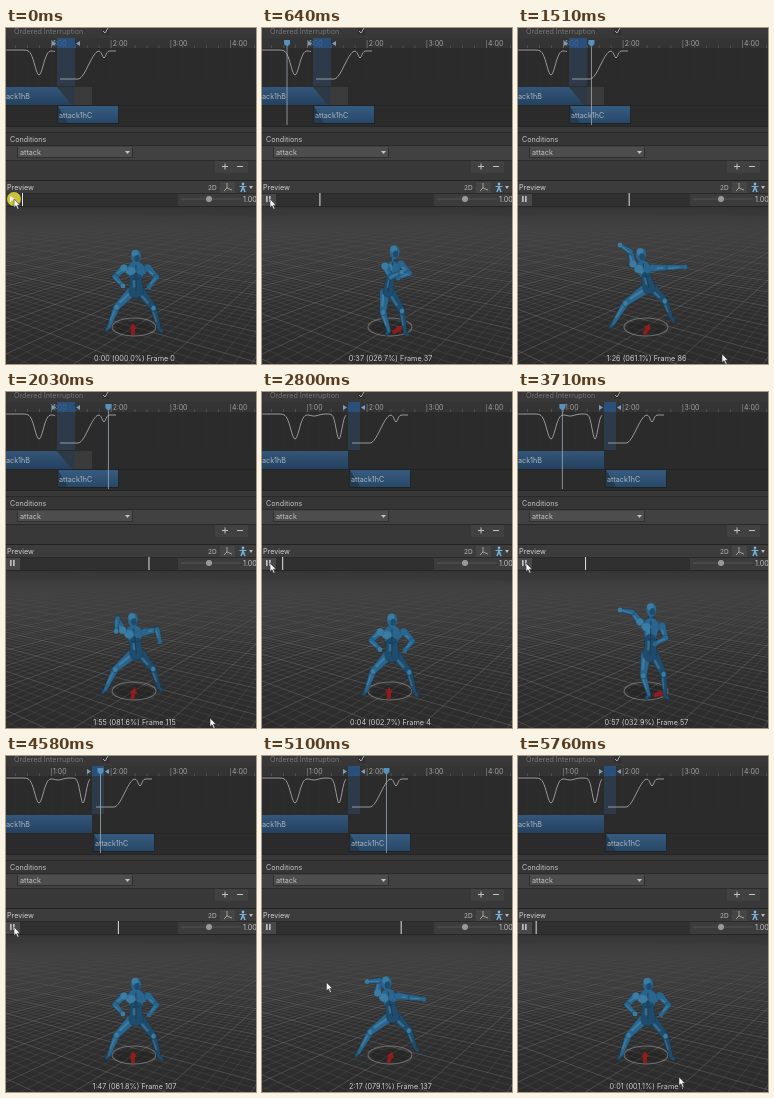
An HTML page with a canvas that plays this animation: 250x336 px, repeating every 5.83 s.

```html
<!DOCTYPE html>
<html lang="en">
<head>
<meta charset="utf-8">
<title>Transition preview</title>
<style>
html, body { margin: 0; width: 100%; height: 100%; overflow: hidden; background: #383838; }
canvas { display: block; width: 250px; height: 336px; }
</style>
</head>
<body>
<canvas id="stage" width="250" height="336"></canvas>
<script>
const c = document.getElementById('stage').getContext('2d');
const LOOP = 5830, CUT = 2620;

// Key poses: body anchors only; elbows, knees and head follow from them.
// hip, neck, [shoulder half width, shoulder tilt], hands, feet, [heading]
const GUARD = [[130, 263], [130, 237], [12, 0], [117, 258], [143, 259], [103, 299], [153, 300], [0]];
const TURN = [[126, 264], [131, 234], [8, -1], [140, 244], [136, 250], [127, 303], [143, 304], [1]];
const REACH = [[132, 263], [133, 229], [11, 2], [102, 218], [137, 252], [131, 303], [147, 303], [1.3]];
const LUNGE = [[131, 260], [125, 235], [10, 2], [102, 217], [167, 239], [95, 296], [153, 289], [.45]];

const clamp = u => Math.min(1, Math.max(0, u));
const smooth = u => u * u * (3 - 2 * u);
const mix = (a, b, u) => a.map((v, k) => v + (b[k] - v) * u);
const bump = (x, mid, width) => Math.exp(-(((x - mid) / width) ** 2));

// The second attack begins at `next`; both takes share the same poses.
function poseAt(frame, next, total) {
  const keys = [[0, GUARD], [38, TURN], [57, REACH], [next, GUARD], [next + 15, LUNGE], [total, GUARD]];
  const n = Math.max(1, keys.findIndex(k => k[0] >= frame));
  const [from, a] = keys[n - 1], [to, b] = keys[n];
  const u = smooth(clamp((frame - from) / (to - from)));
  return a.map((v, k) => mix(v, b[k], u));
}

function rect(x, y, w, h, fill) { c.fillStyle = fill; c.fillRect(x, y, w, h); }
function text(s, x, y, fill = '#c4c4c4', size = 7.2, align = 'left') {
  c.font = size + 'px Inter, sans-serif';
  c.textAlign = align;
  c.fillStyle = fill;
  c.fillText(s, x, y);
}
function trace(p) {
  c.beginPath();
  for (let k = 0; k < p.length; k += 2) c.lineTo(p[k], p[k + 1]);
}
function poly(p, fill) { trace(p); c.closePath(); c.fillStyle = fill; c.fill(); }
function line(p, stroke, width = 1) { trace(p); c.strokeStyle = stroke; c.lineWidth = width; c.stroke(); }
function oval(x, y, rx, ry, fill) {
  c.beginPath(); c.ellipse(x, y, rx, ry, 0, 0, 7); c.fillStyle = fill; c.fill();
}
function vertical(y0, y1, from, to) {
  const g = c.createLinearGradient(0, y0, 0, y1);
  g.addColorStop(0, from);
  g.addColorStop(1, to);
  return g;
}
function plot(from, to, height) {
  const p = [];
  for (let x = from; x <= to; x++) p.push(x, height(x - from));
  line(p, '#b4b4b4', .8);
}

function timeline(isB, frame) {
  const start = isB ? 86 : 51, end = isB ? 98 : 69, clip = isB ? 88 : 52;
  rect(0, 0, 250, 100, '#383838');
  text('Ordered Interruption', 8, 5.5, '#777');
  rect(96, -1, 7, 8, '#303030');
  line([97, 3, 99, 5, 102, 0], '#aaa');
  rect(0, 10, 250, 10, '#343434');
  rect(0, 20, 250, 78, '#2b2b2b');
  rect(0, 77, 250, 1, '#252525');
  for (let k = -3; k < 18; k++) {
    const x = 45 + k * 11.94, major = k % 5 === 0;
    rect(x, major ? 12 : 17, .8, major ? 8 : 3, major ? '#777' : '#555');
    rect(x, 20, .6, 38, '#303030');
    if (major && k >= 0) text(k / 5 + 1 + ':00', x + 2, 17.5, '#a5a5a5', 6.9);
  }

  rect(start, 10, end - start, 10, 'rgba(40,87,140,.8)');
  rect(start, 20, end - start, 38, 'rgba(47,88,130,.35)');
  rect(0, 59, 86, 18, vertical(59, 77, '#34567a', '#24415f'));
  if (!isB) {
    poly([51, 59, 86, 59, 86, 77, 66, 77], '#3b3b3b');
    poly([51, 59, 69, 59, 69, 77, 66, 77], '#2e3948');
  }
  rect(clip - .5, 77.5, 61, 18.5, '#1c2228');
  rect(clip, 78, 60, 17, vertical(78, 95, '#375b80', '#274868'));
  poly([clip, 78, clip, 95, clip + 10, 95], '#243a50');
  text('attack1hB', 24, 71, '#aeb8c2', 7.2, 'right');
  text('attack1hC', clip + 1, 90, '#aeb8c2');

  plot(0, start - 2, x => 22 + 25 * bump(x, 33, 6) + 2 * bump(x, 52, 6) + 25 * bump(x, 77, 4));
  plot(clip + 2, clip + 58, x => 51 - 28 * smooth(clamp((x - 18) / 21)) + 7 * bump(x, 44, 2.5));
  for (const [x, way] of [[start - 1, 1], [end + 1, -1]])
    poly([x - 4 * way, 13, x - 4 * way, 18, x, 15.5], '#7ba0bf');

  const x = frame - 12.7;
  if (frame > 10) {
    line([x, 19, x, 97], '#9fabb4', .8);
    poly([x - 3, 12, x + 3, 12, x + 3, 16, x, 19, x - 3, 16], '#5690bd');
  }
}

function panels(progress, playing) {
  rect(0, 98, 250, 80, '#383838');
  rect(0, 98, 250, 1, '#242424');
  rect(0, 105, 250, 12, '#353535');
  rect(0, 104, 250, 1, '#282828');
  text('Conditions', 4, 113.5);
  rect(0, 117, 250, 15, '#414141');
  rect(0, 117, 250, 1, '#2a2a2a');
  rect(11, 119, 116, 11, '#303030');
  rect(12, 119, 114, 10, '#4d4d4d');
  text('attack', 14, 127);
  poly([119, 123, 124, 123, 121.5, 126], '#c4c4c4');
  rect(0, 132, 250, 1, '#2a2a2a');
  rect(209, 133, 33, 12, '#414141');
  for (const x of [219, 234]) line([x - 3, 138.5, x + 3, 138.5], '#c4c4c4');
  line([219, 135.5, 219, 141.5], '#c4c4c4');

  rect(0, 153, 250, 25, '#3c3c3c');
  rect(0, 152, 250, 1, '#222');
  rect(0, 165, 250, 1, '#2a2a2a');
  text('Preview', 1, 161.5, '#d0d0d0');
  rect(214, 154, 15, 11, '#464646');
  text('2D', 202, 161.5, '#bbb', 6.5);
  line([221, 155, 221, 160, 218, 163], '#bbb', .8);
  line([221, 160, 226, 162], '#bbb', .8);
  oval(237, 156, 1.4, 1.4, '#79b4dc');
  line([233.5, 158.5, 240.5, 158.5], '#79b4dc');
  line([235, 164, 237, 159, 239, 164], '#79b4dc', 1.5);
  poly([243, 158, 247, 158, 245, 161], '#bbb');

  rect(0, 166, 14, 12, playing ? '#484848' : '#3c3c3c');
  if (playing) for (const x of [4, 7]) rect(x, 168, 1.7, 6, '#bdbdbd');
  rect(14, 166, 158, 12, '#303030');
  rect(16 + 155 * progress, 165, 1, 13, '#e0e0e0');
  line([175, 171, 235, 171], '#5c5c5c', .8);
  oval(203, 171, 3, 3, '#999');
  text('1.00', 237, 174);
  rect(0, 178, 250, 1, '#252525');
}

function ground(shift) {
  rect(0, 179, 250, 157, vertical(179, 336, '#363636', '#2c2c2c'));
  const CELL = .036, angle = .6, near = .6, far = 8;
  const put = (x, z) => [128 + 320 * x / z, 165 + 134 / z];
  for (const dir of [angle, angle - Math.PI / 2]) {
    const dx = Math.sin(dir), dz = Math.cos(dir);
    for (const major of [false, true]) {
      c.beginPath();
      for (let k = -140; k <= 140; k++) {
        if ((k % 5 === 0) !== major) continue;
        const d = (k + (dir > 0 ? 0 : shift)) * CELL;
        const at = z => put(d * dz + (z - 1 + d * dx) / dz * dx, z);
        c.moveTo(...at(near));
        c.lineTo(...at(far));
      }
      c.strokeStyle = major ? 'rgba(150,150,150,.42)' : 'rgba(140,140,140,.3)';
      c.lineWidth = major ? .7 : .5;
      c.stroke();
    }
  }
  rect(0, 179, 250, 75, vertical(185, 254, 'rgba(54,54,54,.97)', 'rgba(52,52,52,0)'));
}

function limb(a, b, ra, rb, tone) {
  const [x, y] = a, [u, v] = b, t = Math.atan2(v - y, u - x), q = Math.PI / 2;
  c.beginPath();
  c.arc(x, y, ra, t + q, t - q);
  c.arc(u, v, rb, t - q, t + q);
  c.closePath();
  c.fillStyle = tone;
  c.fill();
  c.strokeStyle = 'rgba(16,40,60,.55)';
  c.lineWidth = .5;
  c.stroke();
  line([x - ra * .3, y + 1, x + (u - x) * .7 - ra * .3, y + (v - y) * .7], 'rgba(105,165,200,.35)', ra * .45);
}

// Middle joint of two equal bones, bent outward on the given side.
function joint(a, b, bone, side) {
  const dx = b[0] - a[0], dy = b[1] - a[1], d = Math.hypot(dx, dy);
  const h = side * Math.sqrt(Math.max(0, bone * bone - d * d / 4)) / d;
  return [(a[0] + b[0]) / 2 + dy * h, (a[1] + b[1]) / 2 - dx * h];
}

function figure([hip, neck, [half, tilt], lh, rh, lf, rf, [turn]]) {
  const base = '#2a658d', dark = '#1f4c6c', light = '#3b7ca3', seam = '#17384f';
  oval(128, 300, 19, 7, 'rgba(20,20,20,.3)');
  c.beginPath();
  c.ellipse(128, 299, 22, 9, 0, 0, 7);
  c.strokeStyle = 'rgba(140,140,140,.65)';
  c.lineWidth = 1.1;
  c.stroke();
  c.save();
  c.translate(127 + 8 * turn * turn, 302);
  c.rotate(turn);
  poly([0, -7, 4, -1, 2, -1, 2, 5, -2, 5, -2, -1, -4, -1], '#8f1d1d');
  c.restore();

  for (const [side, foot, tone] of [[1, rf, dark], [-1, lf, base]]) {
    const top = [hip[0] + side * half * .4, hip[1] + 1];
    const knee = joint(top, foot, Math.hypot(foot[0] - top[0], foot[1] - top[1]) * .51, side);
    limb(foot, [foot[0] + side * 2.5, foot[1] + 3], 2.1, 1.8, dark);
    limb(knee, foot, 3.4, 1.8, tone);
    limb(top, knee, 5, 3.2, tone);
    oval(...knee, 2.2, 2.6, light);
  }

  const head = mix(neck, hip, -.33), mid = mix(neck, hip, .55), waist = half * .5;
  limb(neck, head, 2.8, 2.8, dark);
  limb([neck[0], neck[1] + 5], mid, half * .75, waist, base);
  limb(mid, hip, waist, waist + 1.2, dark);
  line([...neck, ...mid, ...hip], seam, .8);
  for (const [side, hand, tone] of [[1, rh, base], [-1, lh, light]]) {
    const top = [neck[0] + side * half, neck[1] + 3 + side * tilt];
    const elbow = joint(top, hand, 12.5, side);
    oval(neck[0] + side * half * .45, neck[1] + 6, half * .42, 4, tone);
    line([mid[0] + side * waist * .7, mid[1] - 1, ...mid], seam, .6);
    limb(top, elbow, 3.6, 2.6, base);
    limb(elbow, hand, 2.8, 1.9, base);
    oval(...top, 3.6, 3.6, tone);
    oval(...hand, 2.4, 2.5, tone);
  }
  oval(...head, 5, 7, base);
  oval(head[0] - 1, head[1] - 3, 3.4, 3.4, light);
  oval(head[0] + 1, head[1] + 2, 2.7, 3.5, dark);
}

function pointer([x, y], click) {
  if (click) {
    oval(8, 171, 7, 7, '#c9c23a');
    poly([4, 168, 4, 174, 9, 171], '#eee');
  }
  const p = [x, y, x, y + 8.5, x + 2, y + 6.7, x + 3.6, y + 10.3, x + 5, y + 9.7, x + 3.4, y + 6.2, x + 6, y + 6.2];
  poly(p, '#f4f4f4');
  line([...p, x, y], '#222', .5);
}

function draw(now) {
  const t = now % LOOP, isB = t >= CUT;
  const total = isB ? 173.3 : 141.1;
  const click = isB ? t < 2720 : t < 50;
  const played = isB ? 4.6 + (t - 2800) * .0576 : 37.65 + (t - 640) * .0557;
  const frame = click ? 0 : played % total, progress = frame / total;

  timeline(isB, frame);
  ground(progress * 2);
  panels(progress, !click);
  figure(poseAt(frame, isB ? 107 : 71, total));

  const n = Math.floor(frame), pct = (progress * 100).toFixed(1).padStart(5, '0');
  const label = `${Math.floor(n / 60)}:${String(n % 60).padStart(2, '0')} (${pct}%) Frame ${n}`;
  text(label, 129, 333, '#181818', 7.3, 'center');
  text(label, 128.5, 332.5, '#d4d4d4', 7.3, 'center');

  const moved = smooth(clamp(isB ? (t - 4780) / 780 : (t - 900) / 500));
  pointer(mix([8, 171], isB ? [161, 321] : [204, 326], moved), click);
}

function loop() {
  draw(performance.now());
  requestAnimationFrame(loop);
}
loop();
</script>
</body>
</html>
```
